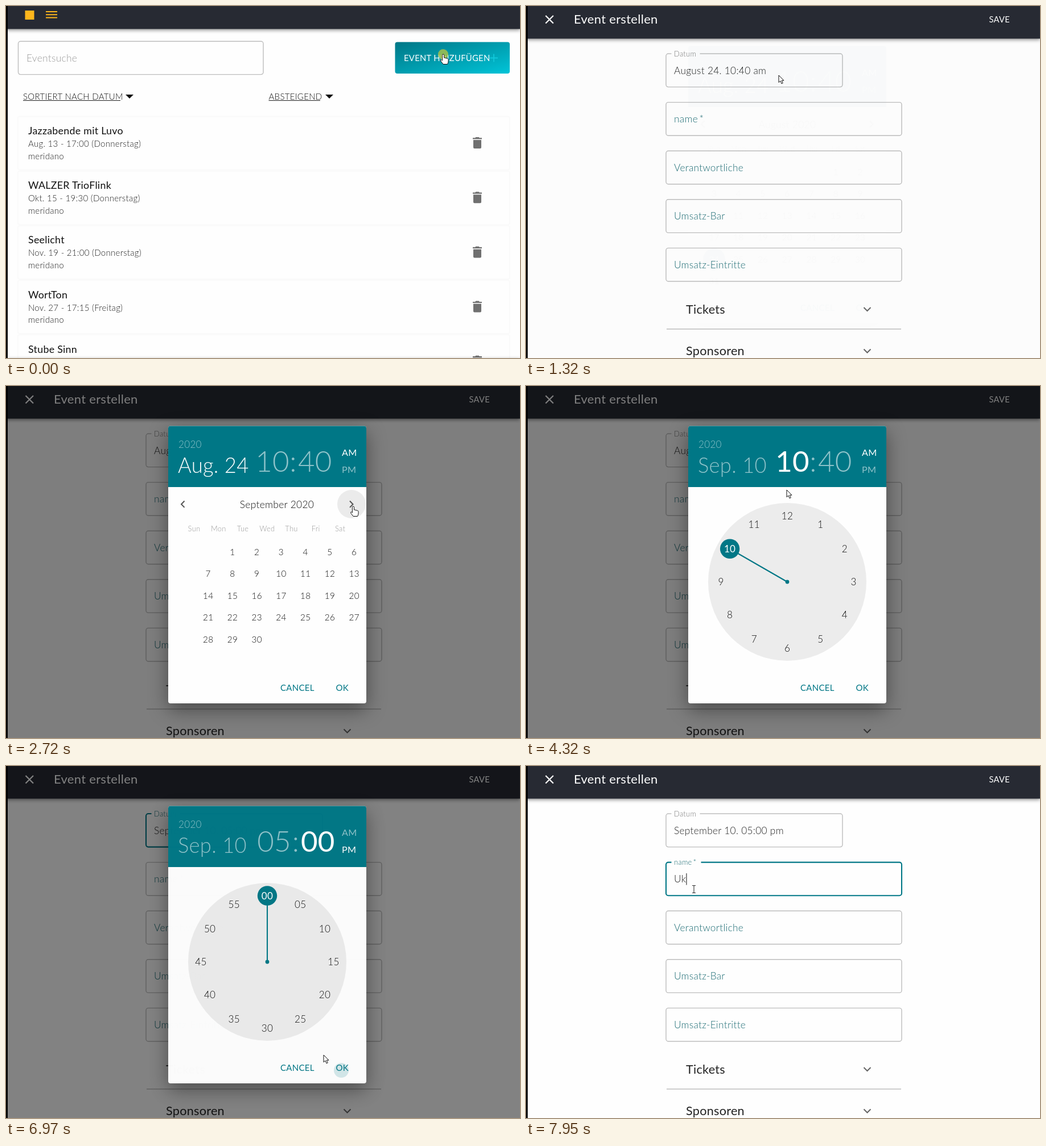
Write an HTML page that moves like this. It is 903x620 px and loops after 8 s.

```html
<!DOCTYPE html>
<html lang="de">
<head>
<meta charset="utf-8">
<title>Event erstellen</title>
<style>
html, body { margin: 0; width: 100%; height: 100%; overflow: hidden; background: #fefefe; }
svg { display: block; width: 903px; height: 620px; font-weight: 300; letter-spacing: .018em; }
text { font-family: Lato, "Open Sans", sans-serif; white-space: pre; }
#bar, #formBar { filter: drop-shadow(0 2px 3px rgba(0,0,0,.45)); }
#paper { filter: drop-shadow(0 11px 17px rgba(0,0,0,.42)); }
</style>
</head>
<body>
<svg viewBox="0 0 903 620">
  <defs>
    <linearGradient id="button" x1="0" y1="0" x2="1" y2="1">
      <stop stop-color="#007786"/><stop offset="1" stop-color="#00c4d8"/>
    </linearGradient>
    <clipPath id="days"><rect x="285" y="265" width="348" height="240"/></clipPath>
    <clipPath id="month"><rect x="330" y="190" width="252" height="40"/></clipPath>
  </defs>
  <rect width="903" height="620" fill="#fefefe"/>
  <g id="page"></g>
  <rect id="pageShade" width="903" height="620"/>
  <g id="form">
    <rect y="-10.5" width="903" height="700" fill="#fefefe"/>
    <g id="fields"></g>
    <g id="formTop"></g>
  </g>
  <rect id="formShade" width="903" height="620"/>
  <g id="picker">
    <g id="paper">
      <rect x="285" y="70.5" width="348" height="488.5" rx="4" fill="#fefefe"/>
      <path d="M285 178V74.5q0-4 4-4H629q4 0 4 4V178Z" fill="#007786"/>
    </g>
    <g id="pickerTop"></g>
    <g id="pickerBody"></g>
    <circle id="okRipple" cx="589" cy="536" r="13" fill="#007786"/>
    <g id="actions"></g>
  </g>
  <circle id="clickMark" cx="768" cy="85" r="9" fill="#c2c83c" opacity=".72"/>
  <g id="cursor"></g>
  <rect width="3" height="620"/>
</svg>
<script>
const LOOP = 8000;
const TEAL = '#007786', LABEL = '#1a6a72', FAINT = 'rgba(255,255,255,.56)';
const STRONG = 'font-weight="400"';
const $ = id => document.getElementById(id);
const clamp = v => Math.max(0, Math.min(1, v));
const progress = (t, start, length) => clamp((t - start) / length);
const easeOut = (p, power = 3) => 1 - (1 - p) ** power;
const smooth = p => p * p * (3 - 2 * p);
const mix = (a, b, p) => a + (b - a) * p;

const text = (x, y, size, fill, label, more = '') =>
  `<text x="${x}" y="${y}" font-size="${size}" fill="${fill}" ${more}>${label}</text>`;
const centered = (x, y, size, fill, label, more = '') =>
  text(x, y, size, fill, label, `text-anchor="middle" ${more}`);
const line = (d, stroke, width = 2) =>
  `<path d="${d}" fill="none" stroke="${stroke}" stroke-width="${width}"/>`;
const disc = (x, y, r, fill) => `<circle cx="${x}" cy="${y}" r="${r}" fill="${fill}"/>`;
const box = (x, y, w, h, stroke, width = 1.4) =>
  `<rect x="${x}" y="${y}" width="${w}" height="${h}" rx="4" fill="none" stroke="${stroke}" stroke-width="${width}"/>`;

function eventList() {
  const events = [
    ['Jazzabende mit Luvo', 'Aug. 13 - 17:00 (Donnerstag)'],
    ['WALZER TrioFlink', 'Okt. 15 - 19:30 (Donnerstag)'],
    ['Seelicht', 'Nov. 19 - 21:00 (Donnerstag)'],
    ['WortTon', 'Nov. 27 - 17:15 (Freitag)'],
    ['Stube Sinn', '']
  ];
  return events.map(([title, date], i) => `<g transform="translate(0 ${i * 96.2})">
    <rect x="21" y="194.5" width="864" height="94" rx="3" fill="#fefefe" stroke="#fafafa" stroke-width="2"/>
    ${text(39, 226, 17.8, '#111', title, STRONG)}
    ${text(39, 248, 15, '#222', date)}
    ${text(39, 269.5, 15, '#222', 'meridano')}
    <path d="M821 236H835V249q0 2-2 2H823q-2 0-2-2ZM820 232.3H824.3L825.3 231H830.7L831.7 232.3H836V234.5H820Z" fill="#707070"/>
  </g>`).join('');
}

function sortLabel(x, end, label) {
  return text(x, 164.5, 15, '#111', label) + line(`M${x} 166.5H${end}`, '#222', 1.1) +
    `<path d="M${end + 9} 156h14l-7 7Z" fill="#111"/>`;
}

$('page').innerHTML =
  box(21.5, 62.2, 430.5, 58.4, '#bdbdbd') +
  text(36, 97.5, 17.4, '#999', 'Eventsuche') +
  '<rect x="683.5" y="63.5" width="201.5" height="55.5" rx="4" fill="url(#button)"/>' +
  text(699, 97, 14.8, '#fff', 'EVENT HINZUFÜGEN', STRONG) +
  line('M850 91.5H864M857 84.5V98.5', '#12c8da', 1.8) +
  sortLabel(30, 201, 'SORTIERT NACH DATUM') + sortLabel(461.5, 552, 'ABSTEIGEND') +
  eventList() +
  '<rect id="bar" y="-10" width="903" height="50.5" fill="#272a33"/>' +
  '<rect x="33.5" y="8" width="16" height="16" fill="#ffb61c"/>' +
  line('M70 10H90M70 15.3H90M70 20.6H90', '#ffb61c');

$('formTop').innerHTML =
  '<rect id="formBar" y="-10.5" width="903" height="68" fill="#272a33"/>' +
  line('M34.5 17L48 30.5M48 17L34.5 30.5', '#fff', 2.2) +
  text(84, 31, 22, '#fff', 'Event erstellen', STRONG) +
  text(813.5, 29, 14.7, '#fff', 'SAVE', STRONG);

$('actions').innerHTML =
  text(482, 536.5, 15, TEAL, 'CANCEL', STRONG) +
  text(579.5, 536.5, 15, TEAL, 'OK', STRONG);

// raised: 0 puts the label inside the field, 1 on its border.
function field(row, width, label, { value = '', raised = 0, focus = false, hover = false } = {}) {
  const y = 84 + row * 85.6;
  const stroke = focus ? TEAL : hover ? '#333' : '#bdbdbd';
  const notch = raised > .5
    ? `<rect x="255.5" y="${y - 3}" width="${row ? 52 : 50}" height="6" fill="#fefefe"/>` : '';
  const color = row || focus ? LABEL : '#777';
  return box(246, y, width, 58.6, stroke, focus ? 2.1 : 1.4) + notch +
    text(260, y + mix(35.5, 4.5, raised), mix(17.3, 12.9, raised), color, label) +
    text(260, y + 35.5, 17.3, '#222', value, row ? 'id="typed"' : '');
}

function section(y, label) {
  return text(281, y + 7.5, 21.6, '#222', label, STRONG) + line(`M593.5 ${y - 3}l6 6 6-6`, '#666');
}

function drawFields(t) {
  const naming = t >= 7500;
  const typed = t >= 7950 ? 'Uk' : t >= 7800 ? 'U' : '';
  $('fields').innerHTML =
    field(0, 310, 'Datum', {
      value: t < 6900 ? 'August 24. 10:40 am' : 'September 10. 05:00 pm',
      raised: 1, focus: t >= 6900 && !naming, hover: t >= 1100 && t < 1320
    }) +
    field(1, 414, 'name\u2009*', { value: typed, raised: smooth(progress(t, 7500, 200)), focus: naming }) +
    field(2, 414, 'Verantwortliche') + field(3, 414, 'Umsatz-Bar') + field(4, 414, 'Umsatz-Eintritte') +
    section(534, 'Tickets') + line('M247 569H659', '#bdbdbd', 1.4) + section(607.5, 'Sponsoren');
  if (naming) {
    const x = 260.8 + (typed ? $('typed').getComputedTextLength() : 0);
    $('fields').insertAdjacentHTML('beforeend', line(`M${x} 189V209.5`, '#222', 1.1));
  }
}

function drawPickerTop(t) {
  const view = t < 3600 ? 'date' : t < 5430 ? 'hour' : 'minute';
  const tone = name => name === view ? '#fff' : FAINT;
  const weight = name => name === view ? STRONG : '';
  const late = t >= 5190, pm = t >= 6560;
  $('pickerTop').innerHTML =
    text(303, 108.5, 17.1, FAINT, '2020') +
    text(302, 153, 36.4, tone('date'), t < 3520 ? 'Aug. 24' : 'Sep. 10') +
    text(late ? 501 : 498, 151, 51, tone('hour'), late ? '05' : '10', 'text-anchor="end" ' + weight('hour')) +
    centered(late ? 509 : 504.5, 151, 51, FAINT, ':') +
    text(late ? 518 : 513, 151, 51, tone('minute'), t < 6250 ? '40' : '00', weight('minute')) +
    text(590, 122.5, 16.2, pm ? FAINT : '#fff', 'AM', STRONG) +
    text(590, 152.5, 16.2, pm ? '#fff' : FAINT, 'PM', STRONG);
  return view;
}

function monthDays(count, firstColumn, selected, shift) {
  let out = '';
  for (let day = 1; day <= count; day++) {
    const cell = day - 1 + firstColumn;
    const x = 330.5 + (cell % 7) * 42.75 + shift, y = 292 + Math.floor(cell / 7) * 38.5;
    const chosen = day === selected;
    if (chosen) out += disc(x, y, 19.3, TEAL);
    out += centered(x, y + 5.5, 15.2, chosen ? '#fff' : '#111', day, chosen ? STRONG : '');
  }
  return out;
}

function calendar(t) {
  const p = easeOut(progress(t, 2560, 350), 4);
  const august = p < 1, september = p > 0;
  const monthName = (x, label) => centered(x, 214.5, 17.4, '#111', label);
  const names = ['Sun', 'Mon', 'Tue', 'Wed', 'Thu', 'Fri', 'Sat'];
  // The old month leaves at twice the speed of the one that enters.
  return (t >= 2440 && t < 2960 ? disc(607, 208, 25, '#ebebeb') : '') +
    line('M313.5 202.5l-5.5 5.7 5.5 5.7M604 202.5l5.5 5.7-5.5 5.7', '#555') +
    names.map((name, i) => centered(330.5 + i * 42.75, 255.5, 12.9, '#999', name)).join('') +
    '<g clip-path="url(#month)">' +
    (august ? monthName(459 - 400 * p, 'August 2020') : '') +
    (september ? monthName(459 + 200 * (1 - p), 'September 2020') : '') +
    '</g><g clip-path="url(#days)">' +
    (august ? monthDays(31, 5, 24, -580 * p) : '') +
    (september ? monthDays(30, 1, t >= 3520 ? 10 : 0, 290 * (1 - p)) : '') + '</g>';
}

function clock(step, chosen) {
  const spot = i => [459 + 116.5 * Math.sin(i * Math.PI / 6), 345 - 116.5 * Math.cos(i * Math.PI / 6)];
  const [hx, hy] = spot(chosen);
  let out = disc(459, 345, 139, '#ececec') + line(`M459 345L${hx} ${hy}`, TEAL, 2.1) +
    disc(459, 345, 3.4, TEAL) + disc(hx, hy, 17.2, TEAL);
  for (let i = 0; i < 12; i++) {
    const [x, y] = spot(i);
    const label = step === 1 ? i || 12 : String(i * 5).padStart(2, '0');
    out += centered(x, y + 6.2, 17.1, i === chosen ? '#fff' : '#111', label, i === chosen ? STRONG : '');
  }
  return out;
}

const pointers = {
  arrow: '<path d="M0 0V12.6L3 10 5 14.8 7.2 13.8 5.2 9.2H9Z" fill="#fff" stroke="#111"/>',
  hand: '<path d="M-1.6 1.6q0-1.6 1.6-1.6t1.6 1.6V6l6 1.4q1.5.4 1.5 2V12q0 3-1.6 5.5H0L-4.5 11.5q-.5-1.5 1-1.7L-1.6 11Z" fill="#fff" stroke="#111"/>',
  beam: line('M-3-6.5H-.7L0-5.8.7-6.5H3M0-6V6M-3 6.5H-.7L0 5.8.7 6.5H3', '#333', 1.1)
};
// Time, x, y, pointer shown from then on.
const path = [
  [0, 768, 85, 'hand'], [230, 768, 85, 'arrow'], [550, 452, 139, 'beam'], [1000, 444, 122, 'beam'],
  [1320, 444, 122, 'arrow'], [1480, 435, 146, 'arrow'], [1700, 435, 146, 'arrow'], [2030, 500, 180, 'arrow'],
  [2140, 500, 180, 'arrow'], [2470, 610, 212, 'hand'], [2950, 610, 212, 'hand'], [3360, 457, 328, 'hand'],
  [3600, 457, 328, 'arrow'], [4320, 458, 183, 'arrow'], [4380, 458, 183, 'arrow'], [4750, 400, 225, 'arrow'],
  [5090, 516, 298, 'arrow'], [5190, 514, 440, 'arrow'], [5430, 514, 440, 'arrow'], [5980, 457, 228, 'arrow'],
  [6260, 457, 228, 'arrow'], [6480, 602, 146, 'hand'], [6580, 602, 146, 'hand'], [6840, 589, 533, 'hand'],
  [6900, 589, 533, 'arrow'], [6970, 558, 509, 'arrow'], [7040, 558, 509, 'arrow'],
  [7250, 398, 392, 'arrow'], [7480, 295, 217, 'beam'], [LOOP, 295, 217, 'beam']
];

function drawCursor(t) {
  const i = path.findLastIndex(key => key[0] <= t);
  const [t0, x0, y0, kind] = path[i], [t1, x1, y1] = path[i + 1];
  const p = smooth((t - t0) / (t1 - t0));
  $('cursor').innerHTML = pointers[kind];
  $('cursor').setAttribute('transform', `translate(${mix(x0, x1, p)} ${mix(y0, y1, p)})`);
}

function render(t) {
  const rise = progress(t, 418, 225);
  $('form').setAttribute('transform', `translate(0 ${631 * (1 - easeOut(rise))})`);
  $('pageShade').setAttribute('opacity', .5 * easeOut(rise, 2));
  drawFields(t);

  const shown = easeOut(progress(t, 1320, 225)) * (1 - smooth(progress(t, 6955, 195)));
  $('formShade').setAttribute('opacity', .5 * shown);
  $('picker').setAttribute('opacity', shown);
  const view = drawPickerTop(t);
  $('pickerBody').innerHTML = view === 'date' ? calendar(t)
    : view === 'hour' ? clock(1, t < 5190 ? 10 : 5)
    : clock(5, t < 6250 ? 8 : 0);
  $('okRipple').setAttribute('opacity', t >= 6860 ? .17 : 0);

  $('clickMark').setAttribute('visibility', t < 230 ? 'visible' : 'hidden');
  drawCursor(t);
}

const begin = performance.now();
function tick() {
  render((performance.now() - begin) % LOOP);
  requestAnimationFrame(tick);
}
tick();
</script>
</body>
</html>
```
